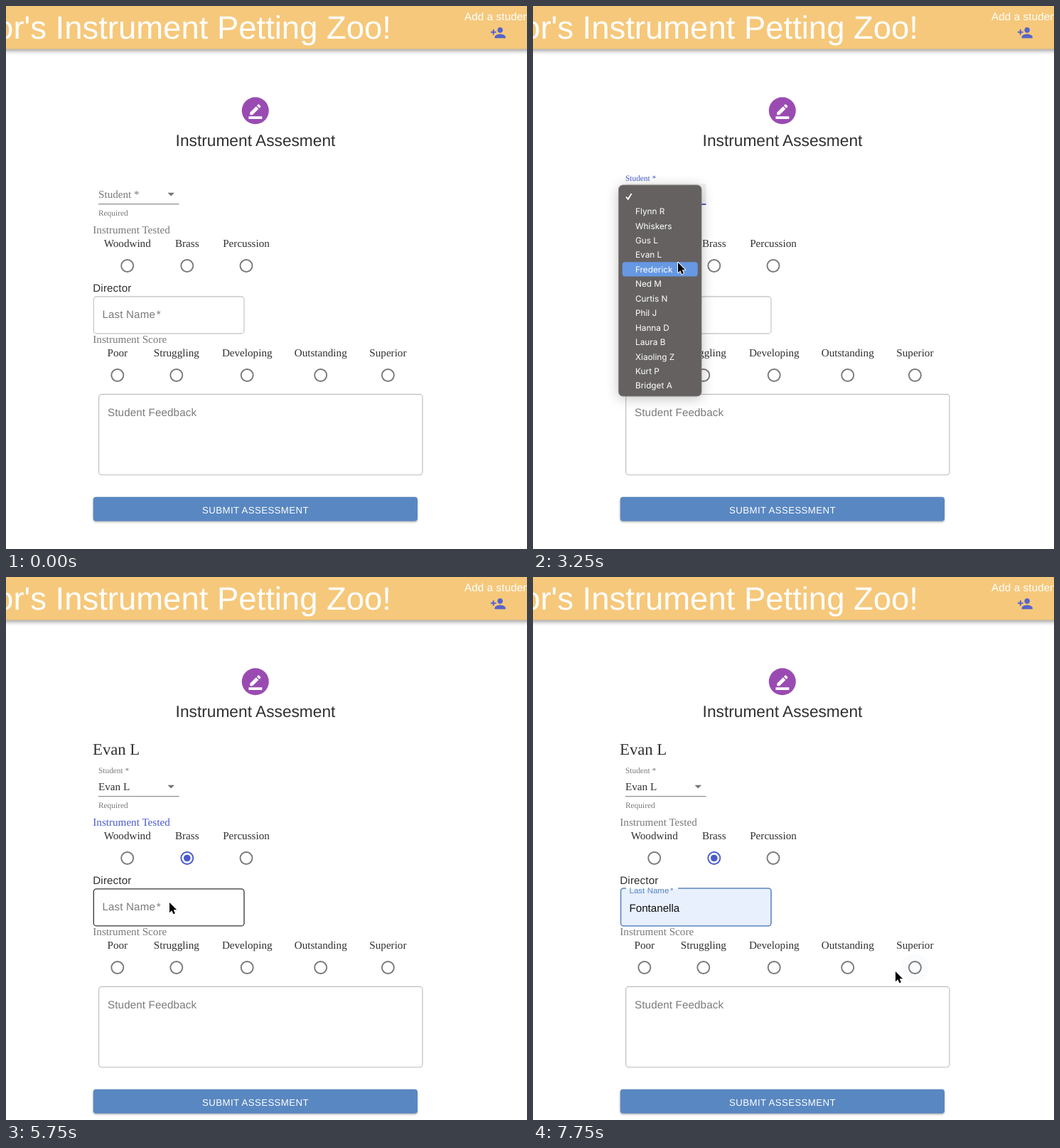
An HTML page with a canvas for the animation above (8 s loop, 733x764 px).

```html
<!DOCTYPE html>
<html lang="en">
<head>
<meta charset="utf-8">
<title>Instrument assessment form</title>
<style>
  html, body { margin: 0; width: 100%; height: 100%; overflow: hidden; background: #fff; }
  canvas { display: block; }
</style>
</head>
<body>
<canvas id="stage" width="733" height="764"></canvas>
<script>
const ctx = document.getElementById('stage').getContext('2d');
ctx.textRendering = 'geometricPrecision';
const SANS = '"Liberation Sans", Arial, sans-serif';
const SERIF = '"Liberation Serif", "Times New Roman", serif';
const UI = 'Inter, sans-serif';
const DARK = '#303030', GREY = '#7a7a7a', BLUE = '#4a5bcb', STEEL = '#5987c1';
const BODY = 15.15, SMALL = 11.36, LARGE = 22.73, HUGE = 45.46;
const LOOP = 8000, STEP = 250;

const STUDENT = 'Evan L', DIRECTOR = 'Fontanella';
const STUDENTS = ['Flynn R', 'Whiskers', 'Gus L', STUDENT, 'Frederick', 'Ned M', 'Curtis N',
  'Phil J', 'Hanna D', 'Laura B', 'Xiaoling Z', 'Kurt P', 'Bridget A'];
const SUGGESTIONS = [DIRECTOR, 'Pohl', 'F', 'In', 'Fontanell', 'Zambrano'];

// Pointer tip: [from ms, x, y]
const POINTER = [
  [500, 35, 398], [750, 85, 352], [1000, 155, 304], [1250, 206, 273],
  [2000, 219, 271], [2750, 215, 295], [3000, 207, 333], [3250, 204, 361],
  [3500, 203, 355], [4500, 216, 371], [4750, 248, 392], [5000, 252, 394],
  [5500, 243, 425], [5750, 230, 458], [6250, 226, 470], [6500, 218, 497],
  [6750, 214, 515], [7000, 213, 520], [7500, 390, 541], [7750, 510, 555]
];

const ICON_ADD = new Path2D('M15 12c2.21 0 4-1.79 4-4s-1.79-4-4-4-4 1.79-4 4 1.79 4 4 4zm-9-2V7H4v3H1v2h3v3h2v-3h3v-2H6zm9 4c-2.67 0-8 1.34-8 4v2h16v-2c0-2.66-5.33-4-8-4z');
const ICON_EDIT = new Path2D('M22 24H2v-4h20v4zM13.06 5.19l3.75 3.75L7.75 18H4v-3.75l9.06-9.06zm4.82 2.68l-3.75-3.75 1.83-1.83c.39-.39 1.02-.39 1.41 0l2.34 2.34c.39.39.39 1.02 0 1.41l-1.83 1.83z');
const ICON_DROP = new Path2D('M7 10l5 5 5-5z');
const ARROW = new Path2D('M0 0V14.2L3.3 11.2 5.5 16.2 7.9 15.2 5.7 10.3H10.2Z');

function text(str, x, y, size, family, color, { align = 'left', spacing = 0, weight = 400 } = {}) {
  ctx.font = `${weight} ${size}px ${family}`;
  ctx.letterSpacing = spacing + 'px';
  ctx.textAlign = align;
  ctx.fillStyle = color;
  ctx.fillText(str, x, y);
}

function box(x, y, w, h, r, fill, stroke, line = 1) {
  ctx.beginPath();
  ctx.roundRect(x, y, w, h, r);
  if (fill) { ctx.fillStyle = fill; ctx.fill(); }
  if (stroke) { ctx.strokeStyle = stroke; ctx.lineWidth = line; ctx.stroke(); }
}

function disc(x, y, r, fill) {
  ctx.beginPath();
  ctx.arc(x, y, r, 0, 7);
  ctx.fillStyle = fill;
  ctx.fill();
}

function shaded(color, blur, dy, draw) {
  ctx.save();
  ctx.shadowColor = color;
  ctx.shadowBlur = blur;
  ctx.shadowOffsetY = dy;
  draw();
  ctx.restore();
}

function icon(path, x, y, color, scale = 0.947) {
  ctx.save();
  ctx.translate(x, y);
  ctx.scale(scale, scale);
  ctx.fillStyle = color;
  ctx.fill(path);
  ctx.restore();
}

function radio(label, x, y, { checked = false, glow = 0 } = {}) {
  text(label, x, y, BODY, SERIF, DARK, { align: 'center' });
  const cy = y + 26.5;
  if (glow) disc(x, cy, 19.5, `rgba(63,81,181,${glow})`);
  ctx.beginPath();
  ctx.arc(x, cy, 8.5, 0, 7);
  ctx.strokeStyle = checked ? BLUE : GREY;
  ctx.lineWidth = 1.9;
  ctx.stroke();
  if (checked) disc(x, cy, 4.8, BLUE);
}

function header() {
  shaded('rgba(0,0,0,.4)', 6, 2, () => box(-20, -20, 773, 80.5, 0, '#f6c87b'));
  text("or's Instrument Petting Zoo!", 542, 46, HUGE, SANS, '#fff', { align: 'right' });
  text('Add a student', 645, 20, BODY, SANS, '#fff', { spacing: 0.14 });
  icon(ICON_ADD, 681, 26.3, '#5564cb');
  disc(350.8, 147.2, 19, '#9a4bb2');
  icon(ICON_EDIT, 339.5, 136.3, '#fff');
  text('Instrument Assesment', 351, 197, LARGE, SANS, DARK, { align: 'center' });
}

function select(t, focus, picked) {
  if (focus) box(130, 250, 113.5, 29, 0, '#f1f1f1');
  const raised = focus || picked;
  text('Student *', 130, raised ? 245.5 : 270, raised ? SMALL : BODY, SERIF, focus ? BLUE : GREY);
  if (picked) text(STUDENT, 130, 270, BODY, SERIF, DARK);
  icon(ICON_DROP, 220.9, 253.3, '#757575');
  const hover = t >= 2000 && t < 2250;
  ctx.fillStyle = focus ? '#4f63c6' : hover ? '#484848' : '#949494';
  ctx.fillRect(130, 278, 113.5, focus || hover ? 2 : 1.3);
  text('Required', 130, 295, SMALL, SERIF, GREY);
}

function nameField(t) {
  const focus = t >= 6000, filled = t >= 6750, preview = t < 7250;
  if (!focus) {
    const hover = t >= 5750;
    box(123.3, 408.9, 211.7, 52, 4, null, hover ? '#333' : '#c0c0c0', hover ? 1.3 : 1.1);
    text('Last Name', 135.5, 438.5, BODY, SANS, GREY, { spacing: 0.14 });
    text('*', 211.8, 438.5, BODY, SANS, GREY);
    return;
  }
  box(123.5, 408, 211.5, 53, 4, filled ? '#e8effd' : null, STEEL, 1.6);
  ctx.fillStyle = '#fff';
  ctx.fillRect(131, 406.5, 73, 2.6);
  text('Last Name', 135.5, 414.5, SMALL, SANS, STEEL, { spacing: 0.1 });
  text('*', 193, 414.5, SMALL, SANS, STEEL);
  if (filled) text(DIRECTOR, 135.5, preview ? 440 : 440.5, preview ? 12 : BODY, preview ? UI : SANS, '#111');
  if (preview) {
    ctx.fillStyle = '#111';
    ctx.fillRect(135.3, 426.5, 1, 17);
  }
}

function form(t, focus, picked) {
  select(t, focus, picked);
  const testing = t >= 5000 && t < 6000;
  text('Instrument Tested', 122.3, 320, BODY, SERIF, testing ? BLUE : GREY);
  radio('Woodwind', 170.7, 339);
  radio('Brass', 254.8, 339, { checked: t >= 5000, glow: t >= 4750 && t < 5500 ? 0.04 : 0 });
  radio('Percussion', 338, 339);
  text('Director', 122.3, 402, BODY, SANS, DARK, { spacing: 0.14 });
  nameField(t);
  text('Instrument Score', 122.3, 474, BODY, SERIF, GREY);
  radio('Poor', 156.8, 493);
  radio('Struggling', 239.8, 493);
  radio('Developing', 339.2, 493);
  radio('Outstanding', 442.7, 493);
  radio('Superior', 537.4, 493, { glow: t >= 7750 ? 0.025 : 0 });
  box(130.6, 546.4, 455.4, 113.4, 4, null, '#bdbdbd', 1.1);
  text('Student Feedback', 143, 576.5, BODY, SANS, GREY, { spacing: 0.14 });
  shaded('rgba(0,0,0,.3)', 3, 1.5, () => box(122.7, 690.7, 456.3, 34, 4, STEEL));
  text('SUBMIT ASSESSMENT', 351, 713.5, 13.25, SANS, '#fff', { align: 'center', spacing: 0.38 });
}

function studentMenu(y) {
  const pitch = 20.43, top = 258;
  shaded('rgba(0,0,0,.25)', 18, 3, () => box(120.5, 252, 116.5, 297, 6, '#656161'));
  box(120.5, 252, 116.5, 297, 6, null, '#7d7a7a', 0.8);
  const row = Math.max(0, Math.floor((y - top) / pitch));
  box(125.7, top + row * pitch, 106, pitch, 4, '#6698e3');
  ctx.beginPath();
  ctx.moveTo(131, 268.5);
  ctx.lineTo(133.7, 271.8);
  ctx.lineTo(138.6, 264);
  ctx.strokeStyle = '#fff';
  ctx.lineWidth = 1.9;
  ctx.stroke();
  STUDENTS.forEach((name, i) =>
    text(name, 144, 293.2 + i * pitch, 11.8, UI, '#fff'));
}

function suggestions(y) {
  const pitch = 35, top = 501.5;
  shaded('rgba(0,0,0,.35)', 4, 1, () => box(120.8, 493.7, 216, 225.3, 3, '#292a2d'));
  if (y >= top) {
    ctx.fillStyle = '#404143';
    ctx.fillRect(120.8, top, 216, pitch);
  }
  SUGGESTIONS.forEach((name, i) =>
    text(name, 132.5, 523.3 + i * pitch, 12, UI, '#f1f1f1', { weight: 500 }));
}

function pointer(x, y) {
  ctx.save();
  ctx.translate(x, y);
  ctx.lineJoin = 'round';
  ctx.strokeStyle = '#fff';
  ctx.lineWidth = 2;
  ctx.stroke(ARROW);
  ctx.fillStyle = '#000';
  ctx.fill(ARROW);
  ctx.restore();
}

function draw(t) {
  const focus = t >= 2250 && t < 5000, picked = t >= 4000;
  const tip = POINTER.filter(p => p[0] <= t).pop();
  ctx.fillStyle = '#fff';
  ctx.fillRect(0, 0, 733, 764);
  header();
  if (picked) text(STUDENT, 122, 250, LARGE, SERIF, DARK);
  ctx.save();
  if (picked) ctx.translate(0, 30);
  form(t, focus, picked);
  ctx.restore();
  if (t >= 2500 && t < 4000) studentMenu(tip[2]);
  if (t >= 6250 && t < 7250) suggestions(tip[2]);
  if (tip) pointer(tip[1], tip[2]);
}

const start = performance.now();
function tick() {
  const t = (performance.now() - start) % LOOP;
  draw(Math.floor(t / STEP) * STEP);
  requestAnimationFrame(tick);
}
tick();
</script>
</body>
</html>
```
